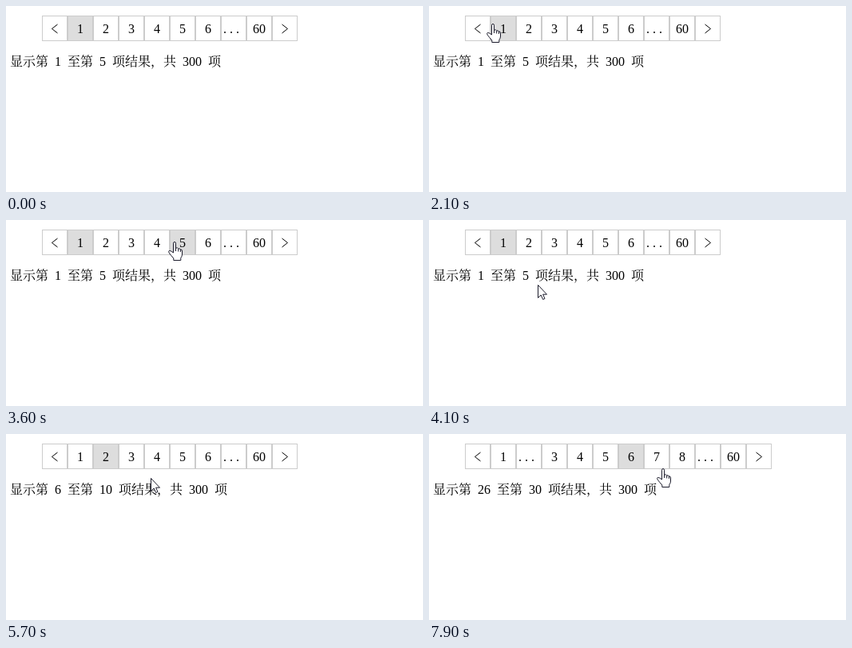
An HTML page for the animation above (8000 ms loop, 522 px wide and 233 px high).

```html
<!DOCTYPE html>
<html lang="zh-CN">
<head>
<meta charset="utf-8">
<title>分页</title>
<style>
  html, body { margin: 0; width: 100%; height: 100%; overflow: hidden; background: #fff; }
  svg { display: block; }
  text {
    font: 400 16px "Liberation Serif", "Noto Serif CJK SC", "Noto Sans CJK SC", "Noto Sans CJK", serif;
    word-spacing: 4px;
    fill: #000;
  }
  .dots { letter-spacing: 4px; }
  .chevron { fill: none; stroke: #000; }
  .cursor { fill: #fff; stroke: #1c1c2c; stroke-linejoin: round; }
</style>
</head>
<body>
<svg width="522" height="233" viewBox="0 0 522 233">
  <g id="pager"></g>
  <text id="info" x="5" y="75"></text>
  <path id="arrow" class="cursor" d="M.5 .5V16.5L4.2 13L6.6 18.5L9 17.5L6.6 12.2H11.5Z"/>
  <path id="hand" class="cursor" d="M.5 14V2.2Q.5 .5 2 .5T3.5 2.2V8.2Q5.8 7 6.7 9Q8.6 8 9.4 10Q11.5 9.5 11.5 12V16Q11.5 18.5 9.8 20.5V23.5H.8V21Q-2 18 -4.8 14.2Q-6 12 -4.8 11.5Q-3 11 .5 14ZM3.5 8V12M6.7 9V12.5M9.4 10V13"/>
</svg>
<script>
const LOOP = 8000, STEP = 100, CELL = 32, LEFT = 45, TOP = 12, MID = TOP + CELL / 2;
const PAGE_SIZE = 5, TOTAL = 300, LAST = TOTAL / PAGE_SIZE;

// The pointer rests between moves; a move with a page begins with a click
const moves = [
  { from: 5, to: 13, x: 85, y: 32 },
  { from: 14, to: 16, x: 58, y: 22 },
  { from: 20, to: 27, x: 266, y: 27 },
  { from: 27, to: 29, x: 322, y: 27 },
  { from: 29, to: 31, x: 345, y: 27 },
  { from: 33, to: 36, x: 209, y: 27 },
  { from: 36, to: 42, x: 118, y: 94 },
  { from: 43, to: 47, x: 130, y: 30 },
  { from: 48, to: 49, x: 126, y: 29, page: 2 },
  { from: 49, to: 52, x: 169, y: 96 },
  { from: 53, to: 59, x: 188, y: 30 },
  { from: 60, to: 64, x: 215, y: 87, page: 4 },
  { from: 64, to: 69, x: 253, y: 30 },
  { from: 72, to: 76, x: 262, y: 122, page: 6 },
  { from: 76, to: 79, x: 291, y: 43 }
];
const ENTRY = { x: 176, y: 252 };
const ease = f => f ** 1.2;

const [pager, info, arrow, hand] = ["pager", "info", "arrow", "hand"].map(id => document.getElementById(id));

function stateAt(step) {
  let pointer = ENTRY, page = 1;
  for (const move of moves.filter(m => m.from < step)) {
    const f = ease(Math.min(1, (step - move.from) / (move.to - move.from)));
    const mix = axis => Math.round(pointer[axis] + (move[axis] - pointer[axis]) * f);
    pointer = { x: mix("x"), y: mix("y") };
    page = move.page || page;
  }
  return { pointer, page };
}

function labelsFor(page) {
  const start = page < 6 ? 1 : page - 3;
  const run = Array.from({ length: 6 }, (_, i) => start + i);
  return ["<", ...(start > 1 ? [1, "..."] : []), ...run, "...", LAST, ">"];
}

function chevron(x, dir) {
  const back = x + 16 - 3.5 * dir, tip = x + 16 + 3.5 * dir;
  return `<path class="chevron" d="M${back} 23L${tip} 28.5L${back} 34"/>`;
}

function glyph(label, x) {
  if (label === "<") return chevron(x, -1);
  if (label === ">") return chevron(x, 1);
  if (label === "...") return `<text class="dots" x="${x + 3}" y="${MID + 6}">...</text>`;
  return `<text x="${x + CELL / 2}" y="${MID + 6}" text-anchor="middle">${label}</text>`;
}

function cell(label, i, page, pointer) {
  const x = LEFT + i * CELL;
  const over = pointer.y < TOP + CELL - 1 && Math.floor((pointer.x - LEFT) / CELL) === i;
  const enabled = label !== "..." && !(label === "<" && page === 1);
  const fill = label === page || (over && enabled) ? "#ddd" : "#fff";
  return `<rect x="${x + 0.5}" y="${TOP + 0.5}" width="${CELL - 1}" height="${CELL - 1}" fill="${fill}" stroke="#ccc"/>` + glyph(label, x);
}

function place(el, { x, y }, shown) {
  el.style.display = shown ? "" : "none";
  el.setAttribute("transform", `translate(${x} ${y})`);
}

function draw(step) {
  const { pointer, page } = stateAt(step);
  const end = page * PAGE_SIZE;
  pager.innerHTML = labelsFor(page).map((label, i) => cell(label, i, page, pointer)).join("");
  info.textContent = `显示第 ${end - PAGE_SIZE + 1} 至第 ${end} 项结果，共 ${TOTAL} 项`;
  const onPager = pointer.y < TOP + CELL;
  place(hand, pointer, onPager);
  place(arrow, pointer, !onPager);
}

let shownStep = -1;
function tick() {
  const step = Math.floor(performance.now() % LOOP / STEP);
  if (step !== shownStep) draw(shownStep = step);
  requestAnimationFrame(tick);
}
tick();
</script>
</body>
</html>
```
